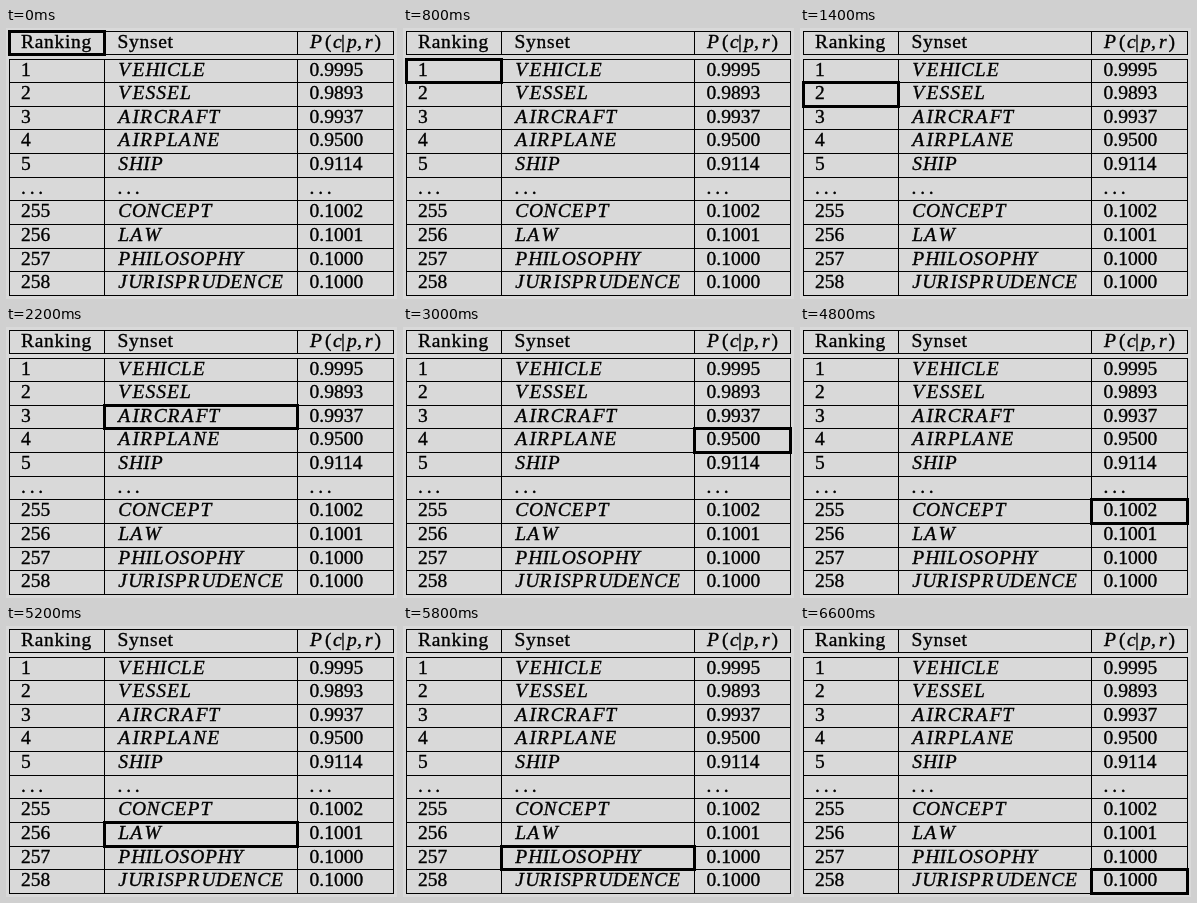
Animation of 391x271 px, one loop 6800 ms. Source, as an HTML page:

```html
<!DOCTYPE html>
<html lang="en">
<head>
<meta charset="utf-8">
<title>Ranking table</title>
<style>
  html, body { margin: 0; width: 100%; height: 100%; overflow: hidden; background: #d9d9d9; }
  svg { display: block; }
  text {
    font: 19.5px "Liberation Serif", serif;
    fill: #000; stroke: #000; stroke-width: .35px;
    white-space: pre;
  }
  .italic { font-style: italic; }
  .head { letter-spacing: .7px; }
  .dots { letter-spacing: 3.8px; }
  path, rect { fill: none; stroke: #000; shape-rendering: crispEdges; }
  path { stroke-width: 1; }
  rect { stroke-width: 3; }
</style>
</head>
<body>
<svg id="stage" width="391" height="271" viewBox="0 0 391 271"></svg>
<script>
(() => {
  const STEP = 200, LOOP = 6800, SIZE = 19.5;
  const ROWS = [
    ["1", "VEHICLE", "0.9995"],
    ["2", "VESSEL", "0.9893"],
    ["3", "AIRCRAFT", "0.9937"],
    ["4", "AIRPLANE", "0.9500"],
    ["5", "SHIP", "0.9114"],
    ["...", "...", "..."],
    ["255", "CONCEPT", "0.1002"],
    ["256", "LAW", "0.1001"],
    ["257", "PHILOSOPHY", "0.1000"],
    ["258", "JURISPRUDENCE", "0.1000"]
  ];
  const EDGES = [3, 98, 291, 387];
  const TEXT_X = [15, 111.5, 303.5];

  // Advances of the wide italic capitals, in em
  const ADVANCE = {
    A: .73, C: .70, D: .74, E: .664, F: .64, H: .73, I: .378, J: .515, L: .615,
    N: .73, O: .752, P: .664, R: .715, S: .55, T: .70, U: .73, V: .73, W: .98, Y: .73
  };

  const stage = document.getElementById("stage");

  function add(tag, attrs, text = "", parent = stage) {
    const el = document.createElementNS("http://www.w3.org/2000/svg", tag);
    for (const key in attrs) el.setAttribute(key, attrs[key]);
    el.textContent = text;
    return parent.appendChild(el);
  }

  // Row 0 is the header; a double rule separates it from the rest
  const rowTop = row => row ? Math.round(30.5 + 23.64 * (row - 1)) : 3;
  const rowBottom = row => row ? rowTop(row + 1) : 26;
  const baseline = row => rowTop(row) + 17;

  function letterStarts(word, x) {
    return [...word].map(ch => {
      const start = x;
      x += ADVANCE[ch] * SIZE;
      return start.toFixed(2);
    }).join(" ");
  }

  function drawRules() {
    const last = ROWS.length;
    const ys = [rowTop(0), rowBottom(0)];
    for (let row = 1; row <= last + 1; row++) ys.push(rowTop(row));
    let d = ys.map(y => `M3 ${y + .5}H388`).join("");
    for (const x of EDGES) {
      d += `M${x + .5} 3V${rowBottom(0) + 1}M${x + .5} ${rowTop(1)}V${rowBottom(last) + 1}`;
    }
    add("path", { d });
  }

  function drawText() {
    const y = baseline(0);
    add("text", { x: TEXT_X[0], y, class: "head" }, "Ranking");
    add("text", { x: TEXT_X[1], y, class: "head" }, "Synset");
    const formula = add("text", { x: "304 319 327 335 341 351 359 368.5", y });
    for (const ch of "P(c|p,r)") {
      add("tspan", { class: /[a-z]/i.test(ch) ? "italic" : "" }, ch, formula);
    }
    ROWS.forEach((cells, i) => cells.forEach((value, col) => {
      const attrs = { x: TEXT_X[col], y: baseline(i + 1) };
      if (value === "...") {
        attrs.class = "dots";
      } else if (col === 1) {
        attrs.class = "italic";
        attrs.x = letterStarts(value, TEXT_X[1] + .8);
      }
      add("text", attrs, value);
    }));
  }

  drawRules();
  drawText();
  const marker = add("rect", {});

  // The marker visits every cell in reading order, resting one extra step on the first
  function draw(time) {
    const step = Math.floor((time % LOOP) / STEP);
    const cell = Math.max(0, step - 1);
    const row = Math.floor(cell / 3), col = cell % 3;
    const x = EDGES[col], y = rowTop(row);
    marker.setAttribute("x", x + .5);
    marker.setAttribute("y", y + .5);
    marker.setAttribute("width", EDGES[col + 1] - x);
    marker.setAttribute("height", rowBottom(row) - y);
  }

  const began = performance.now();
  function tick() {
    draw(performance.now() - began);
    requestAnimationFrame(tick);
  }
  tick();
})();
</script>
</body>
</html>
```
